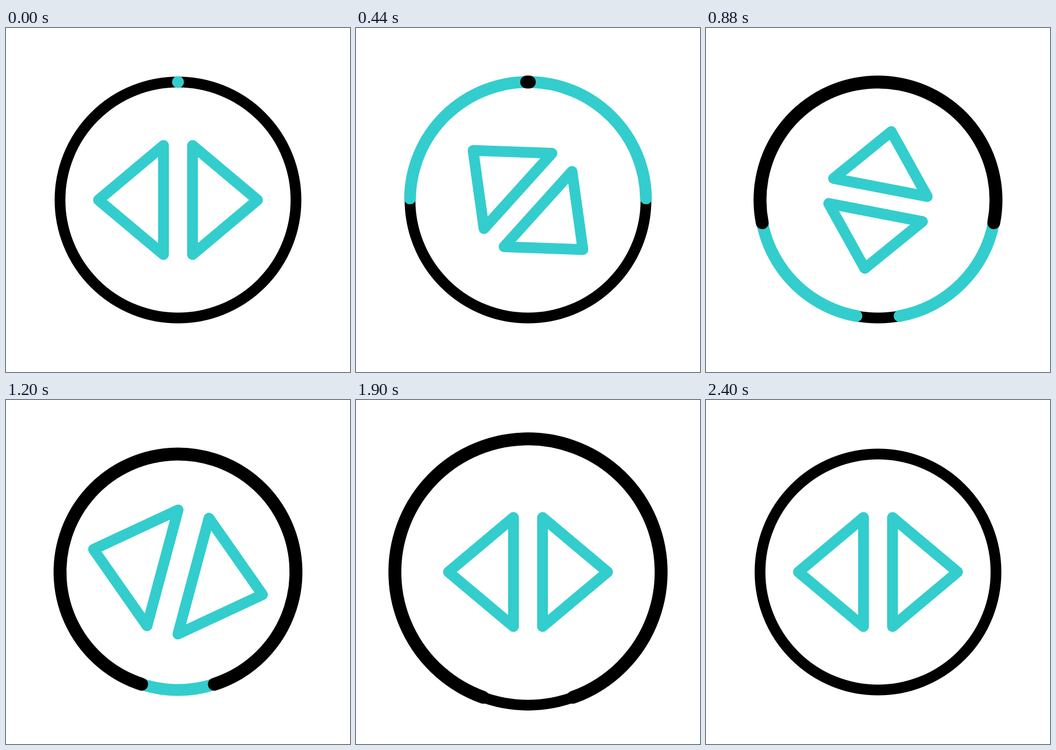
Write an HTML page with a canvas that moves like this. It is 640x640 px and loops after 2.42 s.

```html
<!DOCTYPE html>
<html lang="en">
<head>
<meta charset="utf-8">
<title>Rotating arrows</title>
<style>
  html, body { margin: 0; width: 100%; height: 100%; overflow: hidden; background: #fff; }
  canvas { display: block; width: 640px; height: 640px; }
</style>
</head>
<body>
<canvas id="stage" width="640" height="640"></canvas>
<script>
const ctx = document.getElementById('stage').getContext('2d');
const STEP = 20, STEPS = 121;
const TEAL = '#33cdcd', BLACK = '#000';
const RADIUS = 219.5;

const progress = (n, from, to) => Math.min(1, Math.max(0, (n - from) / (to - from)));
const lerp = (a, b, p) => a + (b - a) * p;
const smooth = p => p * p * (3 - 2 * p);

// cubic-bezier(1/3, 0, 1/3, 1)
function settle(x) {
  let lo = 0, hi = 1;
  for (let i = 0; i < 30; i++) {
    const s = (lo + hi) / 2;
    if (s * (1 - s) + s ** 3 < x) lo = s; else hi = s;
  }
  return smooth((lo + hi) / 2);
}

// Keys are [step, value], eased between neighbours.
function track(keys, n, ease) {
  let value = keys[0][1];
  for (let i = 1; i < keys.length; i++) {
    const [from, a] = keys[i - 1], [to, b] = keys[i];
    if (n >= from) value = lerp(a, b, ease(progress(n, from, to)));
  }
  return value;
}

const ringScale = [[71, 1], [91, 1.15], [111.5, 1]];
const tealSweep = [[0, 0], [59, 1]];
const blackSweep = [[20, 0], [79, 1], [90, 1], [119, 0]];
const turn = [[5.5, 0], [40, 90], [60, 195], [80, 180]];
const size = [[5.5, 1], [40, 0.85], [60, 1.1], [80, 1]];

// Symmetric arc growing from the top down both sides.
function ring(radius, amount, width, color) {
  if (amount <= 0) return;
  const top = -Math.PI / 2, half = Math.PI * amount;
  ctx.beginPath();
  ctx.arc(0, 0, radius, top - half, top + half);
  if (amount >= 1) ctx.closePath();
  ctx.lineWidth = width;
  ctx.strokeStyle = color;
  ctx.stroke();
}

function arrow(angle, scale) {
  const c = Math.cos(angle) * scale, s = Math.sin(angle) * scale;
  ctx.beginPath();
  for (const [x, y] of [[-148, 0], [-27, -101.5], [-27, 101.5]]) {
    ctx.lineTo(x * c - y * s, x * s + y * c);
  }
  ctx.closePath();
  ctx.lineWidth = 20;
  ctx.strokeStyle = TEAL;
  ctx.stroke();
}

function draw(n) {
  ctx.setTransform(1, 0, 0, 1, 0, 0);
  ctx.fillStyle = '#fff';
  ctx.fillRect(0, 0, 640, 640);
  ctx.translate(320, 320);
  ctx.lineCap = ctx.lineJoin = 'round';

  const radius = RADIUS * track(ringScale, n, settle);
  ring(radius, 1, 20, BLACK);
  if (n < 80) ring(radius, track(tealSweep, n, settle), 22, TEAL);
  ring(radius, track(blackSweep, n, settle), 24, BLACK);

  const angle = track(turn, n, smooth) * Math.PI / 180;
  const scale = track(size, n, smooth);
  arrow(angle, scale);
  arrow(angle + Math.PI, scale);
}

const start = performance.now();
function tick() {
  draw(Math.floor((performance.now() - start) / STEP) % STEPS);
  requestAnimationFrame(tick);
}
tick();
</script>
</body>
</html>
```
